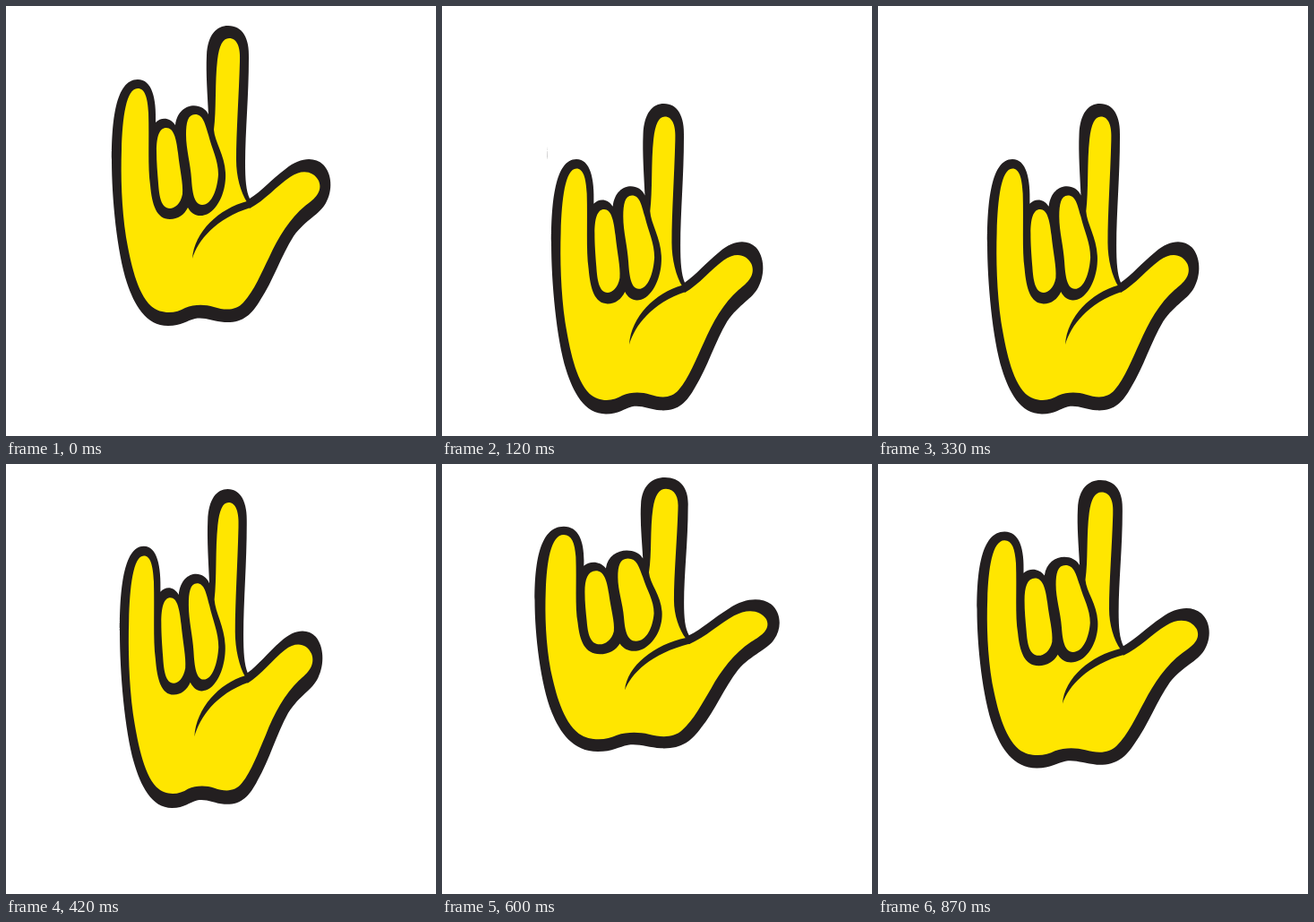
An HTML page that plays this animation: 480x480 px, repeating every 900 ms.

```html
<!DOCTYPE html>
<html lang="en">
<head>
<meta charset="utf-8">
<title>Bouncing hand</title>
<style>
  html, body { margin: 0; width: 100%; height: 100%; overflow: hidden; background: #fff; }
  svg { display: block; width: 100%; height: 100%; }
</style>
</head>
<body>
<svg viewBox="0 0 480 480">
  <g id="hand" fill="#ffe600">
    <path fill="#231f20" d="M147 82C163 82 168 103 167 130C173 124 183 124 189 133
      C192 107 219 106 226 121C225 100 223 75 224 55C225 32 235 22 248 22
      C264 22 272 36 271 58C271 100 267 140 267 175C267 194 268 206 272 215
      C285 207 296 194 312 182C328 169 344 168 354 177C364 187 365 206 357 220
      C350 233 335 238 321 257C307 279 298 307 284 328C274 345 264 354 244 353
      C231 352 222 347 211 349C202 351 196 357 181 357C156 357 143 333 135 309
      C124 275 118 215 118 172C118 130 122 82 147 82Z"/>
    <path d="M147 92C155 92 158 102 159 119C160 150 158 180 161 200
      C163 222 168 238 183 238C192 238 199 233 203 225C208 234 217 237 227 231
      C240 222 246 202 245 186C244 166 233 152 232 138C235 116 233 85 236 60
      C238 44 242 36 249 36C258 36 262 46 261 62C260 100 257 140 257 172
      C257 190 262 208 269 219L272 226C289 217 302 201 317 191C330 182 343 184 349 195
      C354 207 345 215 334 223C317 237 304 258 294 280C285 298 277 318 265 331
      C257 340 245 340 232 336C222 333 210 333 200 337C190 343 174 345 162 335
      C146 320 139 286 134 258C129 225 128 190 129 160C130 125 134 92 147 92Z"/>
    <path d="M179 136C187 136 190 147 192 164C194 183 198 198 197 210
      C195 221 188 226 183 226C173 226 171 212 170 198C169 185 168 175 168 162C168 146 171 136 179 136Z"/>
    <path d="M211 121C220 121 222 131 226 144C230 160 237 172 237 188
      C236 204 230 222 219 222C210 222 208 208 207 193C206 176 201 160 201 144C201 130 203 121 211 121Z"/>
    <path fill="#231f20" d="M269 218C238 226 210 252 208 282C214 262 234 237 273 225Z"/>
  </g>
</svg>
<script>
const hand = document.getElementById("hand");
const STEP = 30, STEPS = 30;
const REST = { width: 245, top: 22, height: 335, centre: 240.5 };

// Rise from the floor to the peak: [step, width, top, bottom]
const poses = [
  [0, 309, 206, 473],
  [3, 237, 109, 455.5],
  [6, 227, 28, 384],
  [7, 245, 22, 357],
  [8, 260, 18, 339.5],
  [12, 274, 15, 321],
  [14, 274, 15, 320.5]
];

const slope = (i, c) => (poses[i + 1][c] - poses[i][c]) / (poses[i + 1][0] - poses[i][0]);

function tangent(i, c) {
  if (i === 0 || i === poses.length - 1) return 0;
  const before = poses[i][0] - poses[i - 1][0];
  const after = poses[i + 1][0] - poses[i][0];
  return (slope(i - 1, c) * after + slope(i, c) * before) / (before + after);
}

// Cubic Hermite interpolation of column c
function valueAt(step, c) {
  let i = 0;
  while (i < poses.length - 2 && step >= poses[i + 1][0]) i++;
  const span = poses[i + 1][0] - poses[i][0];
  const u = (step - poses[i][0]) / span, v = 1 - u;
  return v * v * (1 + 2 * u) * poses[i][c] + u * u * (1 + 2 * v) * poses[i + 1][c]
    + span * u * v * (v * tangent(i, c) - u * tangent(i + 1, c));
}

function draw(now) {
  const phase = (Math.floor(now / STEP) + 22) % STEPS;
  const step = Math.min(phase, STEPS - 1 - phase);   // up, then back down
  const [width, top, bottom] = [1, 2, 3].map(c => valueAt(step, c));
  const sx = width / REST.width, sy = (bottom - top) / REST.height;
  hand.setAttribute("transform",
    `matrix(${sx} 0 0 ${sy} ${REST.centre * (1 - sx)} ${top - REST.top * sy})`);
}

const start = performance.now();
function tick() {
  draw(performance.now() - start);
  requestAnimationFrame(tick);
}
tick();
</script>
</body>
</html>
```
